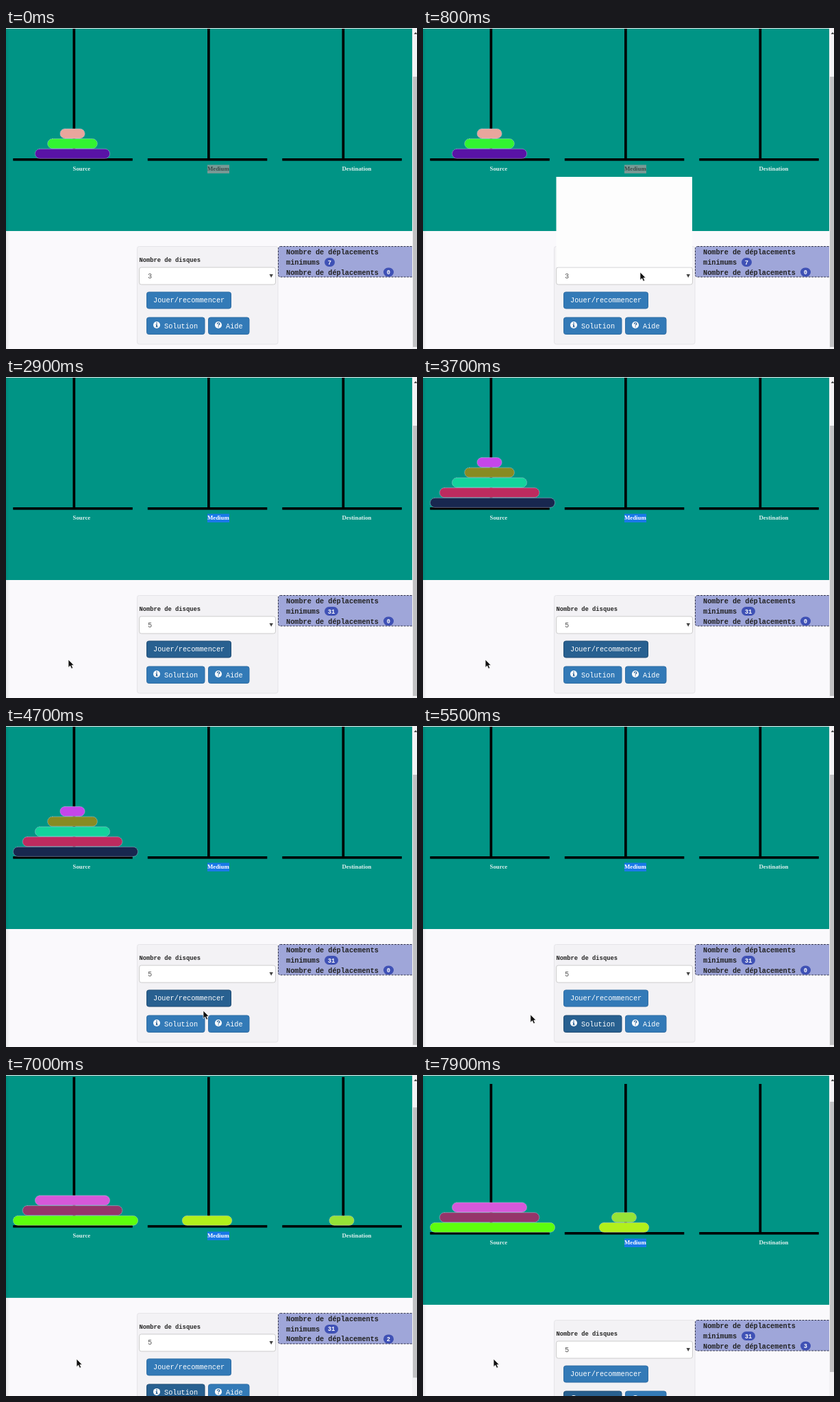
Write an HTML page that moves like this. It is 600 px wide and 468 px high and loops after 8 s.

```html
<!DOCTYPE html>
<html lang="fr">
<head>
<meta charset="utf-8">
<title>Tours de Hanoï</title>
<style>
html, body { margin: 0; width: 100%; height: 100%; overflow: hidden; background: #faf9fc; }
svg { display: block; }
text { font: 10.23px "Liberation Mono", monospace; fill: #fff; white-space: pre; }
.bold { font-weight: bold; fill: #222; }
.small { font-size: 8.77px; }
.badge { font-size: 8.77px; font-weight: bold; text-anchor: middle; }
.peg { font: bold 8.8px "Liberation Serif", serif; fill: #dcefed; }
.btn { fill: #337ab7; stroke: #2e6da4; }
.btn.on { fill: #286090; stroke: #204d74; }
.dark { fill: #555; }
</style>
</head>
<body>
<svg width="600" height="468" viewBox="0 0 600 468">
  <defs>
    <linearGradient id="shade"><stop stop-opacity=".07"/><stop offset="1" stop-opacity="0"/></linearGradient>
  </defs>
  <g id="page">
    <rect y="-60" width="593" height="356" fill="#009485"/>
    <g id="pegs"></g>
    <rect id="mark" x="294" y="199.5" width="32" height="12.5"/>
    <text class="peg" x="97.5" y="208">Source</text>
    <text class="peg" id="medium" x="294" y="208">Medium</text>
    <text class="peg" x="490.5" y="208">Destination</text>
    <g id="discs" stroke="#d6d3ee" stroke-width=".8" stroke-dasharray="1 1"></g>

    <rect x="191.5" y="318.5" width="205.5" height="142.5" rx="3" fill="#f3f2f5" stroke="#e5e4e8"/>
    <text class="bold small" x="194.5" y="341">Nombre de disques</text>
    <rect id="glow" x="193" y="347.5" width="202" height="28" rx="4" fill="#c9e2f7"/>
    <rect id="select" x="194.5" y="349" width="199" height="25" rx="3" fill="#fff"/>
    <text class="dark" id="choice" x="207" y="364.5"></text>
    <path d="M384.5 359h5.4l-2.7 5z" fill="#444"/>

    <rect class="btn" id="play" x="205.5" y="385" width="123" height="24" rx="3"/>
    <text x="215" y="400">Jouer/recommencer</text>
    <rect class="btn" id="solve" x="205.5" y="422" width="84.5" height="24.5" rx="3"/>
    <text x="231" y="437.5">Solution</text>
    <rect class="btn" x="295.5" y="422" width="59.5" height="24.5" rx="3"/>
    <text x="321" y="437.5">Aide</text>
    <g fill="#fff"><circle cx="220" cy="433" r="5"/><circle cx="310" cy="433" r="5"/></g>
    <path d="M219.2 429.5h1.7v1.5h-1.7zM218.6 432h2.3v3.2h.7v1h-3v-1h.6v-2.2h-.6z" fill="#2a6399"/>
    <path d="M308.2 431.6q.1-1.7 1.9-1.7t1.8 1.5q0 .8-1 1.3t-.8 1.2M310.1 435v1.3" fill="none" stroke="#2a6399" stroke-width="1.3"/>

    <rect x="397.5" y="318.5" width="202" height="44.5" rx="3" fill="#9fa6d9" stroke="#33364f" stroke-dasharray="3 1.5"/>
    <text class="bold" x="409" y="330">Nombre de déplacements</text>
    <text class="bold" x="409" y="345">minimums</text>
    <text class="bold" x="409" y="359.5">Nombre de déplacements</text>
    <rect id="minBox" x="465" y="335" width="15" height="13" rx="6.5" fill="#3f51b5"/>
    <text class="badge" id="min" y="344.6"></text>
    <rect x="551" y="349.5" width="15" height="13" rx="6.5" fill="#3f51b5"/>
    <text class="badge" id="count" x="558.5" y="359"></text>
  </g>

  <g id="popup">
    <rect x="194.5" y="217" width="198.5" height="131.5" fill="#fdfdfd"/>
    <g id="options"></g>
  </g>

  <rect width="5" height="468" fill="url(#shade)"/>
  <rect width="600" height="1" fill="#eceaec"/>
  <rect x="593" width="7" height="468" fill="#f3f2f4"/>
  <path d="M595.5 9l2.5-3 2.5 3z" fill="#444"/>
  <rect id="thumb" x="594" width="6" height="394" fill="#c1c1c3"/>
  <path id="cursor" d="M0 0V11.5L2.7 9L4.6 13.2L6.7 12.3L4.9 8.3H8.2Z" fill="#111" stroke="#fff" stroke-width=".7"/>
</svg>
<script>
const $ = id => document.getElementById(id);
const CENTERS = [97, 293.5, 490];
const WIDTHS = [36, 72.5, 109, 145.5, 182];
const FIRST = ["#e9a69d", "#32f431", "#5913a6"];
const PLAYED = ["#c546ea", "#878b22", "#13d39c", "#bd2b5f", "#18274f"];
const SOLVED = ["#96e337", "#b2f01b", "#d658da", "#95356a", "#5dff0d"];

// start time, colours, peg of each disc from the smallest, move count
const STATES = [
  [0, FIRST, [0, 0, 0], 0],
  [2500, [], [], 0],
  [3200, PLAYED, [0, 0, 0, 0, 0], 0],
  [5200, [], [], 0],
  [5800, SOLVED, [2, 0, 0, 0, 0], 1],
  [6700, SOLVED, [2, 1, 0, 0, 0], 2],
  [7600, SOLVED, [1, 1, 0, 0, 0], 3]
];
// time, x, y of the pointer
const TRACK = [
  [200, 420, 470], [600, 317, 356], [1000, 317, 356], [1400, 290, 272], [1700, 290, 272],
  [2000, 282, 378], [2200, 272, 396], [2400, 272, 396], [2900, 91, 412], [4100, 91, 412],
  [4700, 288, 415], [5000, 256, 433], [5200, 256, 433], [5700, 103, 414], [8000, 103, 414]
];

$("pegs").innerHTML = [0, 1, 2].map(i => {
  const x = 10.3 + 196.5 * i;
  return `<rect x="${x + 87.2}" y="-26" width="3.7" height="217"/><rect x="${x}" y="190" width="174.5" height="3.6"/>`;
}).join("");

const smooth = p => p * p * (3 - 2 * p);
const between = (t, a, b) => t >= a && t < b;

function drawDiscs([, colors, pegs]) {
  const height = [0, 0, 0];
  let out = "";
  for (let i = colors.length - 1; i >= 0; i--) {
    const peg = pegs[i], w = WIDTHS[i];
    const x = Math.max(CENTERS[peg] - w / 2, 10.5);
    const y = 176.3 - 14.7 * height[peg]++;
    out += `<rect x="${x}" y="${y}" width="${w}" height="14" rx="7" fill="${colors[i]}"/>`;
  }
  $("discs").innerHTML = out;
}

function drawOptions(t) {
  $("popup").style.display = between(t, 800, 1700) ? "" : "none";
  const hover = t < 1200 ? 3 : t < 1300 ? 4 : 5;
  $("options").innerHTML = t < 900 ? "" : [3, 4, 5, 6, 7, 8].map((n, i) => {
    const y = 217 + 21.9 * i, on = n === hover;
    return `<rect x="194.5" y="${y}" width="198.5" height="21.9" fill="${on ? "#1e90ff" : "none"}"/>
      <text class="${on ? "" : "dark"}" x="207" y="${y + 14.5}">${n}</text>`;
  }).join("");
}

function drawPointer(t) {
  const k = Math.max(1, TRACK.findIndex(p => p[0] > t));
  const [a, ax, ay] = TRACK[k - 1], [b, bx, by] = TRACK[k];
  const p = smooth(Math.max(0, (t - a) / (b - a)));
  $("cursor").setAttribute("transform", `translate(${ax + (bx - ax) * p} ${ay + (by - ay) * p})`);
  $("cursor").style.display = t < 200 ? "none" : "";
}

function draw(now) {
  const t = Math.floor(now % 8000 / 100) * 100;
  const state = STATES.findLast(s => s[0] <= t);
  drawDiscs(state);
  drawOptions(t);
  drawPointer(t);

  const awake = t >= 1700, focused = between(t, 1700, 2400), five = t >= 2500;
  $("mark").setAttribute("fill", awake ? "#1a78e8" : "#789995");
  $("medium").style.fill = awake ? "#fff" : "#374b49";
  $("choice").textContent = awake ? 5 : 3;
  $("glow").style.display = focused ? "" : "none";
  $("select").setAttribute("stroke", focused ? "#66afe9" : "#ccc");
  $("play").classList.toggle("on", between(t, 2400, 5100));
  $("solve").classList.toggle("on", t >= 5100);
  $("min").textContent = five ? 31 : 7;
  $("min").setAttribute("x", five ? 475 : 472.5);
  $("minBox").setAttribute("width", five ? 20 : 15);
  $("count").textContent = state[3];

  const scroll = smooth(Math.min(1, Math.max(0, (t - 6800) / 300)));
  $("page").setAttribute("transform", `translate(0 ${39 * scroll})`);
  $("thumb").setAttribute("y", 71 - 32 * scroll);
}

const start = performance.now();
function tick() {
  draw(performance.now() - start);
  requestAnimationFrame(tick);
}
tick();
</script>
</body>
</html>
```
